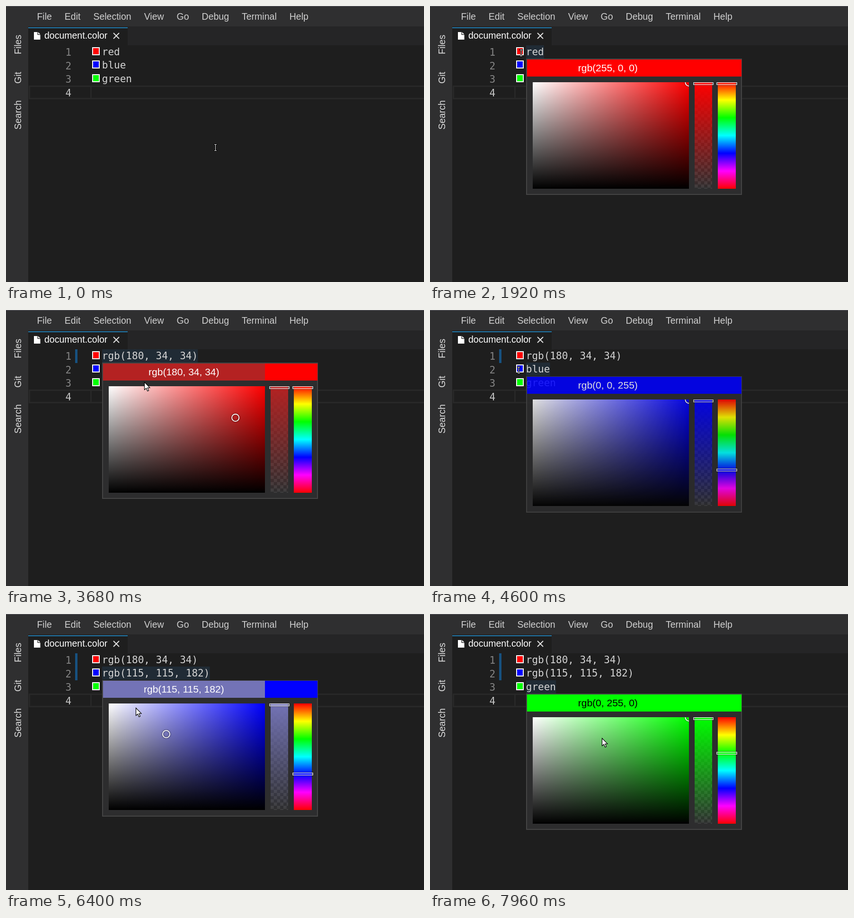
An HTML page with a canvas that plays this animation: 883x583 px, repeating every 8000 ms.

```html
<!DOCTYPE html>
<html lang="en">
<head>
<meta charset="utf-8">
<title>Color picker</title>
<style>
  html, body { margin: 0; width: 100%; height: 100%; overflow: hidden; background: #1e1e1e; }
  canvas { display: block; }
</style>
</head>
<body>
<canvas id="stage" width="883" height="583"></canvas>
<script>
const LOOP = 8000, W = 883, H = 583;
const SANS = '"Liberation Sans", Arial, sans-serif';
const MONO = '"DejaVu Sans Mono", monospace';
const UI = `19.5px ${SANS}`, CODE = `21px ${MONO}`;
const ROW = 28.5, TOP = 83, CHAR = 12.64;
const WHITE = [255, 255, 255];

const screen = document.getElementById('stage').getContext('2d');
const layer = document.createElement('canvas');
layer.width = W;
layer.height = H;
const popup = layer.getContext('2d');

const rgb = c => `rgb(${c.join(', ')})`;
const rgba = (c, a) => `rgba(${c.join(', ')}, ${a})`;

// Each line of the document, with the life of its picker in ms.
const lines = [
  { word: 'red', color: [255, 0, 0], hue: 0, ink: '#fff', number: 105, base: 104, swatch: 87,
    top: 111, header: 113, bottom: 399, open: 1480, close: 4250,
    picked: [180, 34, 34], pick: 3120, edit: 3200, mark: 3280 },
  { word: 'blue', color: [0, 0, 255], hue: 240, ink: '#fff', number: 134, base: 132, swatch: 115,
    top: 140, header: 141, bottom: 428, open: 4520, close: 6880,
    picked: [115, 115, 182], pick: 5760, edit: 5820, mark: 5880 },
  { word: 'green', color: [0, 255, 0], hue: 120, ink: '#000', number: 162, base: 161, swatch: 144,
    top: 168, header: 170, bottom: 456, open: 7160, close: Infinity,
    pick: Infinity, edit: Infinity, mark: Infinity }
];

// Pointer moves: start, end, steps, target x, target y.
const moves = [
  [360, 1000, 17, 222, 124], [1240, 1240, 1, 192, 101], [1440, 1440, 1, 192, 99],
  [2120, 2720, 8, 484, 227], [3680, 3680, 1, 292, 152], [3920, 4320, 7, 187, 127],
  [4960, 5200, 4, 307, 227], [5280, 5360, 2, 311, 251], [5560, 5560, 1, 339, 254],
  [6200, 6200, 1, 313, 250], [6400, 6400, 1, 274, 198], [6680, 6680, 1, 210, 164],
  [6880, 6880, 1, 190, 154], [7640, 7960, 5, 363, 262]
];
const caretSpans = [[420, 920], [1440, 1920], [2420, 2920]];

const ease = p => (1 - Math.cos(Math.PI * p)) / 2;

function pointerAt(t) {
  let x = 442, y = 299;
  for (const [start, end, steps, tx, ty] of moves) {
    if (t < start) break;
    const done = steps === 1 ? 1
      : Math.min(steps, 1 + Math.floor((t - start) / (end - start) * (steps - 1) + 1e-6));
    const p = ease(done / steps);
    x += (tx - x) * p;
    y += (ty - y) * p;
  }
  return { x: Math.round(x), y: Math.round(y) };
}

function rect(g, color, x, y, w, h) {
  g.fillStyle = color;
  g.fillRect(x, y, w, h);
}

function text(g, str, x, y, color, font, align = 'left') {
  g.font = font;
  g.fillStyle = color;
  g.textAlign = align;
  g.fillText(str, x, y);
}

function polygon(g, points) {
  g.beginPath();
  points.forEach(([x, y]) => g.lineTo(x, y));
  g.closePath();
}

function gradient(g, x0, y0, x1, y1, colors) {
  const fill = g.createLinearGradient(x0, y0, x1, y1);
  colors.forEach((c, i) => fill.addColorStop(i / (colors.length - 1), c));
  return fill;
}

function drawFrame(g) {
  rect(g, '#1e1e1e', 0, 0, W, H);
  rect(g, '#2f2f30', 0, 0, W, 43);
  rect(g, '#2f2f30', 0, 43, 47, H - 43);
  rect(g, '#5c5c64', 0, 0, W, 1);
  rect(g, '#252526', 47, 43, W - 47, 40);
  rect(g, '#1e1e1e', 47, 45, 210, 38);
  rect(g, '#1f78ab', 47, 45, 210, 2);

  let x = 65.4;
  for (const item of ['File', 'Edit', 'Selection', 'View', 'Go', 'Debug', 'Terminal', 'Help']) {
    text(g, item, x, 29, '#d0d0d0', UI);
    x += g.measureText(item).width + 27;
  }

  for (const [label, y] of [['Files', 102], ['Git', 164], ['Search', 261]]) {
    g.save();
    g.translate(32, y);
    g.rotate(-Math.PI / 2);
    text(g, label, 0, 0, '#dcdcdc', UI);
    g.restore();
  }

  g.fillStyle = '#fff';
  polygon(g, [[59, 55], [66.5, 55], [66.5, 61], [72.5, 61], [72.5, 71], [59, 71]]);
  g.fill();
  polygon(g, [[67.8, 55], [72.5, 59.7], [67.8, 59.7]]);
  g.fill();
  text(g, 'document.color', 81, 69, '#fff', UI);

  g.strokeStyle = '#e0e0e0';
  g.lineWidth = 2;
  g.beginPath();
  g.moveTo(227, 57);
  g.lineTo(239, 69);
  g.moveTo(239, 57);
  g.lineTo(227, 69);
  g.stroke();
}

function drawEditor(g, t) {
  const border = '#282828';
  rect(g, border, 48, 168, W - 48, 3);
  rect(g, border, 48, 194, W - 48, 3);
  rect(g, border, 48, 168, 3, 29);
  rect(g, border, 178, 168, 3, 29);

  lines.forEach((line, i) => {
    const y = TOP + i * ROW;
    const content = t >= line.edit ? rgb(line.picked) : line.word;
    text(g, String(i + 1), 125.5, line.number, '#858585', CODE);
    if (t >= line.mark) rect(g, '#175180', 146, Math.floor(y), 5, 29);
    if (t >= line.open && t < line.close)
      rect(g, 'rgba(38, 79, 120, 0.25)', 203, Math.floor(y), content.length * CHAR, 28);
    rect(g, '#fff', 182, line.swatch, 16, 17);
    rect(g, rgb(line.color), 184, line.swatch + 2, 12, 13);
    text(g, content, 202.8, line.base, '#d4d4d4', CODE);
  });

  text(g, '4', 125.5, 191, '#c6c6c6', CODE);
  if (caretSpans.some(([on, off]) => t >= on && t < off))
    rect(g, '#aeafad', 178, 168, 3, 29);
}

function drawSlider(g, x, y, w) {
  g.strokeStyle = 'rgba(0, 0, 0, 0.35)';
  g.lineWidth = 1;
  g.strokeRect(x - 0.5, y - 0.5, w + 1, 7);
  g.strokeStyle = 'rgba(255, 255, 255, 0.75)';
  g.lineWidth = 1.6;
  g.strokeRect(x + 0.8, y + 0.8, w - 1.6, 4.4);
}

function drawPicker(g, line, t) {
  const { top, header, bottom, color } = line;
  const current = t >= line.pick ? line.picked : color;
  const max = Math.max(...current), min = Math.min(...current);
  const x = 217, y = header + 48, w = 330, h = 225;

  g.clearRect(0, 0, W, H);
  rect(g, '#454545', 203, top, 456, bottom - top);
  rect(g, '#2d2d2e', 205, header, 452, bottom - 2 - header);
  rect(g, rgb(current), 205, header, 342, 36);
  rect(g, rgb(color), 547, header, 111, 36);
  text(g, rgb(current), 375.8, header + 25, line.ink, `21px ${SANS}`, 'center');

  rect(g, gradient(g, x, 0, x + w, 0, [rgb(WHITE), rgb(color)]), x, y, w, h);
  rect(g, gradient(g, 0, y, 0, y + h, ['rgba(0, 0, 0, 0)', '#000']), x, y, w, h);

  g.save();
  g.beginPath();
  g.rect(x, y, w, h);
  g.clip();
  g.shadowColor = 'rgba(0, 0, 0, 0.8)';
  g.shadowBlur = 3;
  g.strokeStyle = '#fff';
  g.lineWidth = 1.8;
  g.beginPath();
  g.arc(x + w * (max - min) / max, y + h * (1 - max / 255) + 0.4, 7.6, 0, 2 * Math.PI);
  g.stroke();
  g.restore();

  g.save();
  g.beginPath();
  g.rect(559, y, 37, h);
  g.clip();
  const cell = 6.75;
  for (let r = 0; r * cell < h; r++)
    for (let c = r % 2; c * cell < 37; c += 2)
      rect(g, '#3e3e3f', 559 + c * cell, y + r * cell, cell, cell);
  rect(g, gradient(g, 0, y, 0, y + h, [rgb(current), rgba(current, 0)]), 559, y, 37, h);
  g.restore();

  const rainbow = ['#f00', '#ff0', '#0f0', '#0ff', '#00f', '#f0f', '#f00'];
  rect(g, gradient(g, 0, y, 0, y + h, rainbow), 608, y, 38, h);
  drawSlider(g, 556, y, 43);
  drawSlider(g, 605, y + Math.round(line.hue / 360 * (h - 6)), 44);
}

function pickerOpacity(age) {
  return age < 80 ? 0.05 : age < 120 ? 0.86 : 1;
}

function drawArrow(g, x, y) {
  polygon(g, [[0, 0], [0, 16], [3.8, 12.7], [6.4, 18.7], [9, 17.6], [6.5, 11.8], [11.4, 11.6]]
    .map(([dx, dy]) => [x + dx + 0.5, y + dy + 0.5]));
  g.fillStyle = '#fff';
  g.fill();
  g.strokeStyle = '#000';
  g.lineWidth = 1.2;
  g.stroke();
}

function drawBeam(g, x, y) {
  for (const [color, grow] of [['#000', 1], ['#fff', 0]]) {
    const size = 1 + 2 * grow;
    rect(g, color, x - grow, y - 6 - grow, size, 13 + 2 * grow);
    for (const dy of [-7, 6]) rect(g, color, x - 2 - grow, y + dy - grow, 5 + 2 * grow, size);
  }
}

function render(t) {
  drawFrame(screen);
  drawEditor(screen, t);
  const { x, y } = pointerAt(t);
  const line = lines.find(l => t >= l.open && t < l.close);
  if (line) {
    drawPicker(popup, line, t);
    screen.globalAlpha = pickerOpacity(t - line.open);
    screen.drawImage(layer, 0, 0);
    screen.globalAlpha = 1;
  }
  const inside = line && x >= 203 && x < 659 && y >= line.top && y < line.bottom;
  (inside ? drawArrow : drawBeam)(screen, x, y);
}

const began = performance.now();
function tick() {
  render((performance.now() - began) % LOOP);
  requestAnimationFrame(tick);
}
tick();
</script>
</body>
</html>
```
